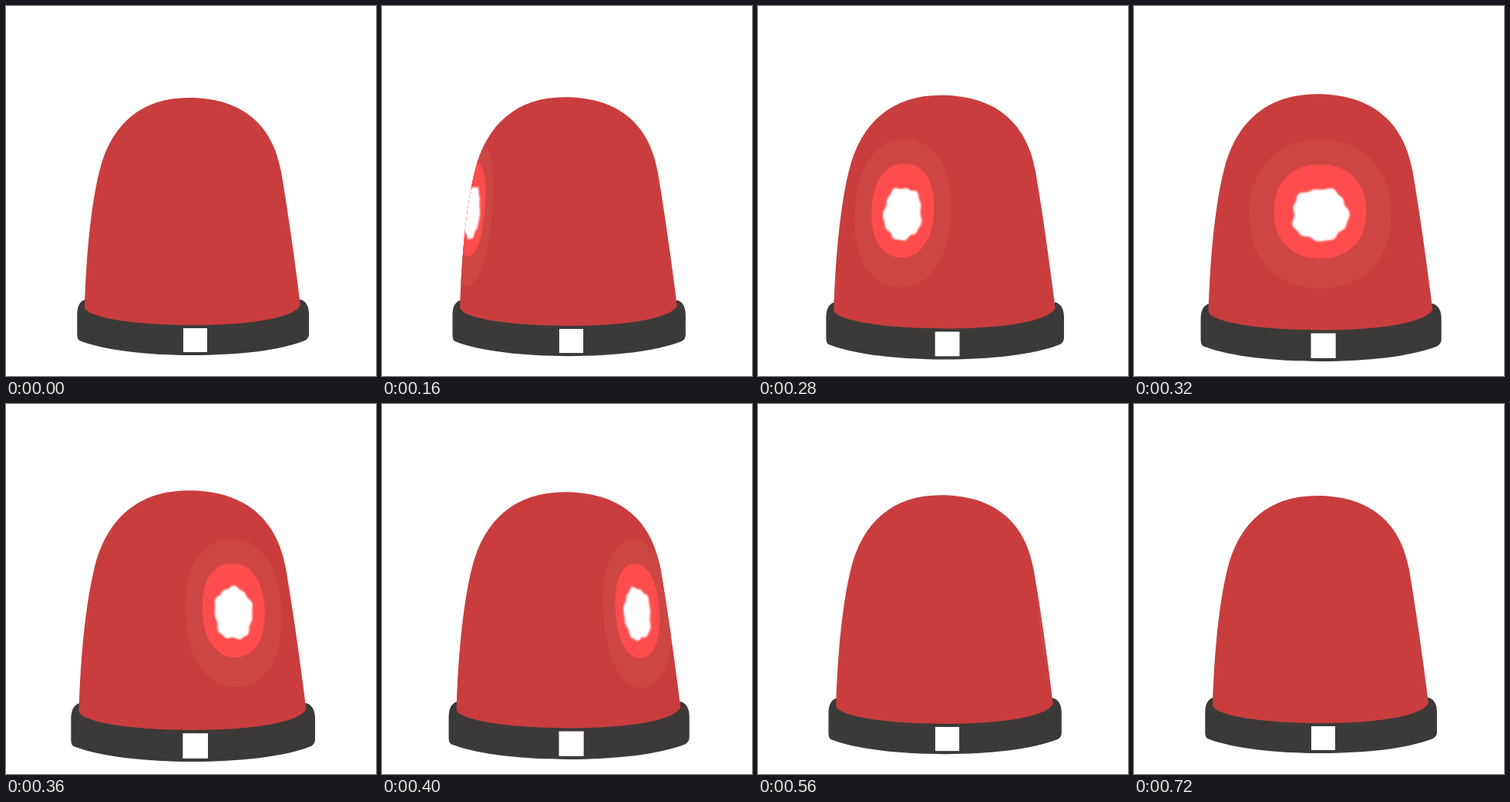
Animation of 480 by 480 pixels, one loop 0.76 s. Source, as an HTML page:

```html
<!DOCTYPE html>
<html lang="en">
<head>
<meta charset="utf-8">
<title>Beacon</title>
<style>
  html, body { margin: 0; width: 100%; height: 100%; overflow: hidden; background: #fff; }
  svg { display: block; width: 100%; height: 100%; }
</style>
</head>
<body>
<svg viewBox="0 0 480 480">
  <defs>
    <path id="dome" d="M102 391C104 320 111 255 121 215C136 153 176 119 237 119C300 119 345 148 357 215C366 268 374 325 382 388C375 404 320 414 243 414C165 414 105 404 102 391Z"/>
    <clipPath id="inside"><use id="mask" href="#dome"/></clipPath>
    <filter id="soft" x="-30%" y="-30%" width="160%" height="160%"><feGaussianBlur stdDeviation="1.3"/></filter>
  </defs>
  <g id="lamp">
    <path fill="#3c3a38" d="M102 381C95 384 92.5 390 92.3 400V426C92.5 432 94 434 98 435C130 447 185 453 242 453C300 453 355 447 388 434C391 432 393 430 393 425V400C393 390 390 384 383 381Z"/>
    <rect x="230" y="418" width="31" height="31" fill="#fff"/>
    <use href="#dome" fill="#c93d3e"/>
  </g>
  <g clip-path="url(#inside)">
    <path id="halo" fill="#cd4644"/>
    <path id="glow" fill="#ff4c4c"/>
    <path id="core" fill="#fff" filter="url(#soft)"/>
  </g>
</svg>
<script>
const LOOP = 760, STEP = 40, PEAK = 360, FACING = 320;
const $ = id => document.getElementById(id);
const [lamp, mask, halo, glow, core] = ['lamp', 'mask', 'halo', 'glow', 'core'].map($);

// Rounded, slightly boxy outline; rough > 0 gives it a ragged edge.
function blob(x, y, rx, ry, lean, rough = 0, seed = 0) {
  const bend = v => Math.sign(v) * Math.abs(v) ** .9;
  let d = '';
  for (let i = 0; i < 96; i++) {
    const a = i / 96 * Math.PI * 2;
    const r = 1 + rough * (Math.sin(5 * a + seed) + .7 * Math.sin(11 * a + 2 * seed));
    const dy = bend(Math.sin(a)) * ry * r;
    const dx = bend(Math.cos(a)) * rx * r + dy * lean * .06;
    d += (i ? 'L' : 'M') + (x + dx).toFixed(2) + ' ' + (y + dy).toFixed(2);
  }
  return d + 'Z';
}

function draw(t) {
  const rise = Math.max(0, 1 - Math.abs(t - PEAK) / PEAK);
  const scale = 1 + .053 * rise ** 2.8;
  const grow = `translate(242.5 245) scale(${scale}) translate(-242.5 -245)`;
  lamp.setAttribute('transform', grow);
  mask.setAttribute('transform', grow);

  // The light sweeps around, narrowing towards both sides.
  const turn = (t - FACING) / 80;
  const shift = 111 * Math.atan(1.05 * turn), lean = shift / 92;
  const x = 241.5 + shift, y = 270 + 2 * lean;
  const w = 92 / (1 + 1.1 * Math.abs(turn) ** 1.2), h = 96;
  halo.setAttribute('d', blob(x, y, w, h, lean));
  glow.setAttribute('d', blob(x, y - 3.5, w * .65, h * .635, lean));
  core.setAttribute('d', blob(x, y + .5, w * .39, h * .35, lean, .045, t / STEP * 1.7));
}

function tick() {
  draw(Math.floor(performance.now() % LOOP / STEP) * STEP);
  requestAnimationFrame(tick);
}
tick();
</script>
</body>
</html>
```
